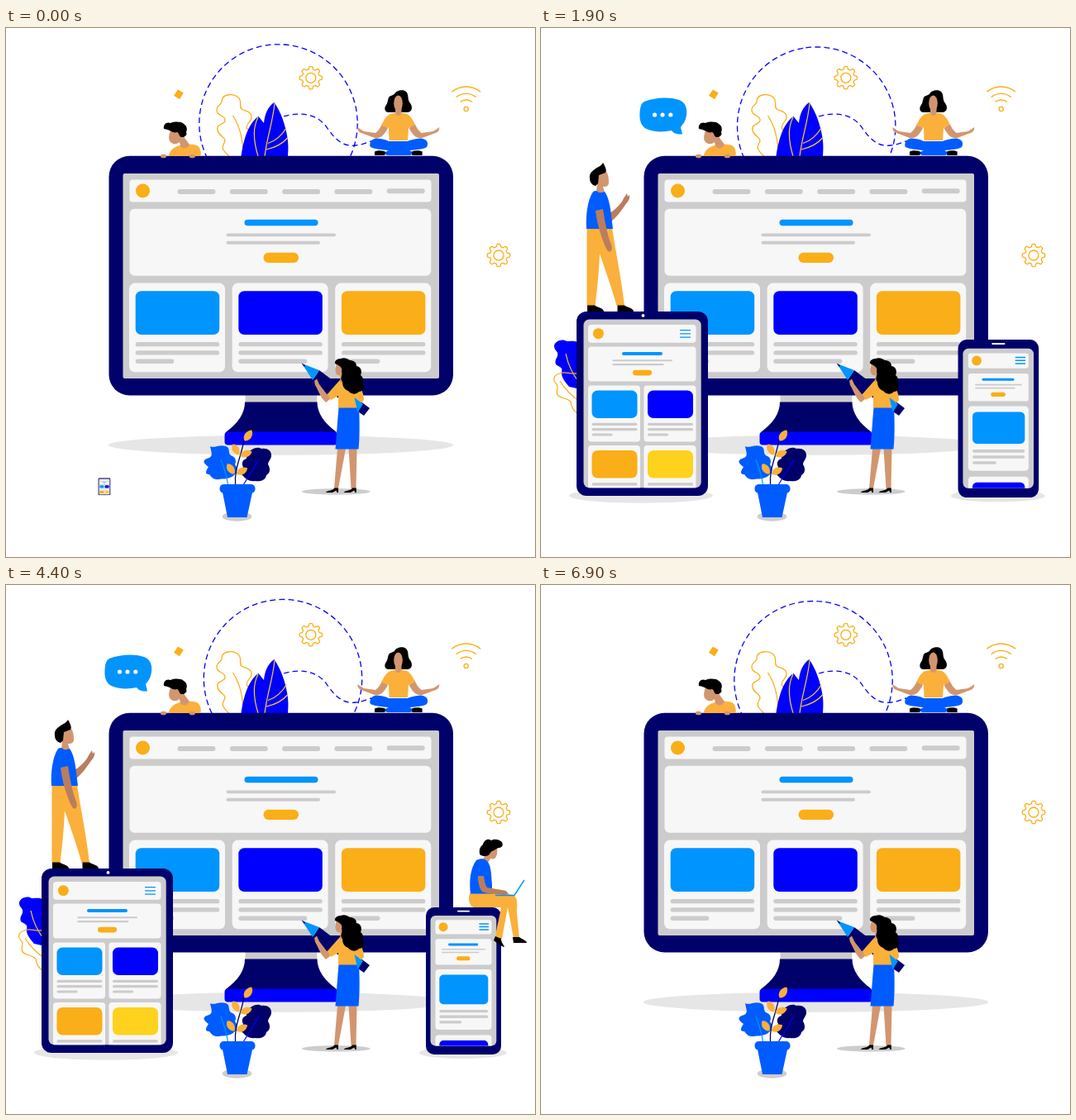
An HTML page with a canvas that plays this animation: 640x640 px, repeating every 7 s.

```html
<!DOCTYPE html>
<html lang="en">
<head>
<meta charset="utf-8">
<title>Responsive design</title>
<style>
html, body { margin: 0; width: 100%; height: 100%; overflow: hidden; background: #fff; }
canvas { display: block; width: 640px; height: 640px; }
</style>
</head>
<body>
<canvas id="stage" width="640" height="640"></canvas>
<script>
const ctx = document.getElementById('stage').getContext('2d');
const LOOP = 7000, STEP = 100, TAU = Math.PI * 2;
const NAVY = '#00006b', BLUE = '#0000ff', MID = '#005cff', SKY = '#0094ff';
const ORANGE = '#faae17', CLOTH = '#fbb03b', YELLOW = '#ffd21e';
const GREY = '#cccccc', PANEL = '#f7f7f7', SHADE = '#e6e6e6';
const SKIN = '#d2966f', TAN = '#b97e5d', BLACK = '#000', WHITE = '#fff';

// Drawing helpers
function box(x1, y1, x2, y2, r, color) {
  ctx.fillStyle = color;
  ctx.beginPath();
  ctx.roundRect(x1, y1, x2 - x1, y2 - y1, r);
  ctx.fill();
}
function pill(x1, y1, x2, y2, color = GREY) { box(x1, y1, x2, y2, (y2 - y1) / 2, color); }
function oval(x, y, rx, ry, color) {
  ctx.fillStyle = color;
  ctx.beginPath();
  ctx.ellipse(x, y, rx, ry, 0, 0, TAU);
  ctx.fill();
}
function dot(x, y, r, color) { oval(x, y, r, r, color); }
function shape(d, color) {
  ctx.fillStyle = color;
  ctx.fill(new Path2D(d));
}
function line(d, color, width = 1.3) {
  ctx.strokeStyle = color;
  ctx.lineWidth = width;
  ctx.stroke(new Path2D(d));
}
function scaled(s, x, y, draw) {
  if (s <= 0) return;
  ctx.save();
  ctx.translate(x, y);
  ctx.scale(s, s);
  ctx.translate(-x, -y);
  draw();
  ctx.restore();
}
function mirrored(axis, draw) {
  draw();
  ctx.save();
  ctx.translate(2 * axis, 0);
  ctx.scale(-1, 1);
  draw();
  ctx.restore();
}

// Motion: each key is [time, value, easing towards it]
const linear = x => x;
const outQuad = x => 1 - (1 - x) ** 2;
const inOut = x => x < .5 ? 2 * x * x : 1 - 2 * (1 - x) ** 2;
function track(t, keys) {
  if (t <= keys[0][0]) return keys[0][1];
  for (let i = 1; i < keys.length; i++) {
    const [t0, v0] = keys[i - 1], [t1, v1, ease = inOut] = keys[i];
    if (t < t1) return v0 + (v1 - v0) * ease((t - t0) / (t1 - t0));
  }
  return keys[keys.length - 1][1];
}
const MOTION = {
  tablet: [[0, .092], [500, 1.172, outQuad], [800, 1], [5350, 1], [5750, 0, linear]],
  phone: [[1200, 0], [1900, 1.073, outQuad], [2200, 1], [6300, 1], [6700, 0, linear]],
  walker: [[850, 0], [1300, 1], [4850, 1], [5250, 0]],
  bubble: [[1300, 0], [1700, 1.54], [1900, 1], [4700, 1], [4900, 1.3], [5200, 0]],
  sitter: [[1900, 0], [2200, 1.17], [2400, 1], [5800, 1], [6200, 0]],
  bulb: [[2500, 0], [2900, 2.2], [3200, 1], [3500, 1], [3800, 2.15], [4200, 0]]
};

function orbit(t) {
  const a = TAU * t / LOOP;
  ctx.save();
  ctx.translate(332.75, 115.5);
  ctx.rotate(-a);
  ctx.strokeStyle = BLUE;
  ctx.lineWidth = 1.3;
  const period = TAU * 95.7 / 54;
  ctx.setLineDash([period * .62, period * .38]);
  ctx.beginPath();
  ctx.arc(-3.25, 0, 95.7, 0, TAU);
  ctx.stroke();
  ctx.restore();
}

function gear(x, y) {
  ctx.strokeStyle = ORANGE;
  ctx.lineWidth = 1.3;
  ctx.beginPath();
  for (let i = 0; i <= 160; i++) {
    const a = TAU * i / 160, r = 12.1 + 1.6 * Math.tanh(2.6 * Math.cos(8 * a));
    ctx.lineTo(x + r * Math.cos(a), y + r * Math.sin(a));
  }
  ctx.closePath();
  ctx.moveTo(x + 6, y);
  ctx.arc(x, y, 6, 0, TAU);
  ctx.stroke();
}

function wifi() {
  ctx.strokeStyle = ORANGE;
  ctx.lineWidth = 1.3;
  ctx.beginPath();
  ctx.arc(556.7, 98, 2.6, 0, TAU);
  ctx.stroke();
  for (const r of [11, 18.7, 27]) {
    ctx.beginPath();
    ctx.arc(556.7, 98, r, -Math.PI / 2 - .7, -Math.PI / 2 + .7);
    ctx.stroke();
  }
}

function backdrop() {
  ctx.setLineDash([6.5, 4.3]);
  line('M336 107C360 100 378 106 388 120C398 135 408 144 423 142C432 141 437 138 442 137', BLUE);
  ctx.setLineDash([]);
  line('M269.5 155C263 148 260 146 264 139C268 132 258 132 256 124C254 115 264 118 265 112C266 105 254 107 255 98C256 92 262 93 261 88C262 80 273 79 280 83C287 88 281 94 285 98C289 101 296 100 297 107C298 113 291 114 291 121L296 126', ORANGE);
  line('M274.500 106C283 119 287 136 287 155', ORANGE);
  shape('M284.500 155C287 138 292 116 305.500 107L312 115C313 104 317 95 324.500 90C333 102 338 118 340 130C342 140 341.500 148 341 155Z', BLUE);
  line('M325 91C323 113 316 131 313 155M305 108C298 121 300 139 305 155M339 121C333 131 325 137 317 139.500M340.500 133C333 142 324 145 315 147', YELLOW, 1.2);
  shape('M208 74.500L214.700 78.500 210 86.200 203 81.800Z', ORANGE);
  gear(368.8, 60.3);
  gear(596, 275);
  wifi();
}

function monitor() {
  oval(332.5, 504.7, 208.5, 12, SHADE);
  box(289.5, 440, 376.3, 453, 0, GREY);
  shape('M289 452.500H376.500C376.500 466 385 478 400 489H266C281 478 289 466 289 452.500Z', NAVY);
  box(264.5, 488.5, 401, 504.5, 4, BLUE);
  box(124.5, 154.8, 541, 444.5, 25, NAVY);
  box(141.5, 176, 524, 424, 2, GREY);
  box(149.5, 183.5, 514.5, 210.5, 4, PANEL);
  dot(165.5, 197, 8.5, ORANGE);
  for (let i = 0; i < 5; i++) {
    const x = 207.5 + i * 63.3, y = i < 4 ? 195 : 194.3;
    pill(x, y, x + 46, y + 6);
  }
  box(149.5, 218.7, 514.3, 299.8, 6, PANEL);
  pill(288.5, 231.8, 377.5, 239.3, SKY);
  pill(266.5, 248.4, 399, 252.3);
  pill(266.5, 257.8, 380, 261.7);
  box(311.5, 271.8, 354, 284, 6, ORANGE);
  [[SKY, 46.5], [BLUE, 83], [ORANGE, 46.5]].forEach(([color, last], i) => {
    const x = 149 + i * 124.6;
    box(x, 308.6, x + 116, 416.3, 7, PANEL);
    box(x + 7.7, 318.2, x + 109.2, 371, 7, color);
    for (let k = 0; k < 3; k++) {
      const y = 380 + k * 10.3;
      pill(x + 7.7, y, x + 7.7 + (k < 2 ? 101.5 : last), y + 5.3);
    }
  });
}

function boy() {
  shape('M196.500 155C198 148 204 143 211 142C220 140 232 140 234 145C236 149 236 152 235.500 155Z', CLOTH);
  shape('M209 133L214 130 222 141C219 147 213 146 211 143Z', SKIN);
  shape('M199 124C197 130 196 135 199 138C203 142 208 140 210 138L214 130 207 124Z', SKIN);
  shape('M191 122C190 117 194 113 199 115C204 113 212 113 215 116C220 119 219 124 218 126C220 130 215 132 214 132C209 133 210 127 207 126C202 128 199 123 191 122Z', BLACK);
  oval(190.5, 155, 3.6, 2.3, SKIN);
  oval(225.3, 155, 3.6, 2.3, SKIN);
}

function yogi() {
  shape('M470 80C472 75 481 74 484 77C488 81 485 86 489 91C492 95 492 101 486 102H463C458 102 457 97 460 93C463 89 461 83 466 82Z', BLACK);
  mirrored(474.8, () => {
    shape('M455 116L462 121C457 131 452 134 446 133L430 127C426 126 425 122 425.500 120L428 122 433 125 447 127C451 124 453 120 455 116Z', SKIN);
    shape('M446 149.500C452 147 457 149 460 150L458 154H446Z', BLACK);
  });
  shape('M448 133.500C441 134 439 141 441 144C447 147 455 147 463 148C457 150 458 154 462 154H489C492 153 493 150 488 148C497 147 505 147 509 144C512 139 509 134 502 133.500C495 134 488 136 486 137H463C460 135 455 134 448 133.500Z', MID);
  shape('M470 103H479.500C487 103 490 107 495 117L487 121 486 136H463.500L463 121 454 118C459 108 461 104 470 103Z', CLOTH);
  shape('M471 96H478.500V103C477 107 473 107 471 103Z', SKIN);
  oval(474.5, 91, 5.3, 9.5, SKIN);
}

function painter() {
  oval(399.3, 560.8, 41.5, 3.7, GREY);
  shape('M379 414L440 460 433 469 371 426Z', NAVY);
  shape('M358 406L379 414 371 426Z', SKY);
  shape('M357.500 405.500L362 408 361 410Z', NAVY);
  shape('M401 509H411L402 557H397Z M414.500 509H424.500L423.500 557H417.500Z', SKIN);
  for (const dx of [0, 21.8]) {
    ctx.save();
    ctx.translate(dx, 0);
    shape('M387 561.700C390 559 395 560 397.500 556.500H402V562H400.500L399.500 559.500 395 562H387Z', BLACK);
    ctx.restore();
  }
  shape('M402.500 459H427C428 477 428 495 426.500 509.500H398.500C400 492 401 475 402.500 459Z', MID);
  shape('M373 427L376 424.500 379 431C382 435 386 440 388 443L394 441 392 449 387 453C380 447 378 438 374 432Z', SKIN);
  shape('M405 425C400 430 394 437 389 443L393 450 402 445V459.500H425L433 450C433 440 428 432 420 428Z', CLOTH);
  shape('M421.500 447L432 455 425.500 465Z', SKY);
  shape('M400 406C398 411 398 416 400 419C402 421 404 420 404.500 420L404 428 413 431V408Z', SKIN);
  shape('M398 406C397 401 403 400 405 400C410 398 414 401 416 402C420 402 424 404 424 409C430 410 431 416 429 420C434 424 431 428 432 431C435 437 430 440 427 440C422 445 416 442 414 439C409 437 407 433 407 428C403 424 408 420 406 416C408 410 402 408 398 406Z', BLACK);
}

function pottedPlant() {
  oval(279.5, 591, 17.8, 5.8, GREY);
  shape('M247 506C252 509 258 503 266 506C272 508 268 514 272 517C278 519 279 524 277 528C282 534 279 541 271 544C266 546 262 545 258 546C251 547 248 543 246 540C239 540 243 534 245 531C238 526 238 523 243 521C252 519 248 513 247 506Z', MID);
  line('M260 522C263 531 267 540 268.500 553', SKY, 1.2);
  shape('M296 511C301 507 306 507 309 509C316 508 321 511 321 517C321 522 317 524 317 528C320 533 320 538 315 541C314 548 306 549 301 548C296 549 290 546 287 542C283 540 285 533 287 531C284 526 287 522 291 521C291 517 292 513 296 511Z', NAVY);
  line('M306 522L287 553', BLUE, 1.2);
  line('M277.500 553C276 532 285 518 288 498', NAVY, 1.3);
  const leaf = (x, y, angle, size = 1) => {
    ctx.save();
    ctx.translate(x, y);
    ctx.rotate(angle);
    ctx.scale(size, size);
    shape('M-7.500 0C-4 -6 4 -5 7.500 0C4 5 -4 6 -7.500 0Z', CLOTH);
    ctx.restore();
  };
  leaf(293, 493, -.98, 1.05);
  leaf(278, 510, 1.05);
  leaf(290.5, 515, -.35);
  leaf(272, 533.5, .95);
  leaf(285.5, 536, -.5);
  box(258.5, 552, 301.5, 562.7, 5, MID);
  shape('M262 562H298L291.500 592H268Z', MID);
}

function menu(x1, x2, top, gap) {
  for (let i = 0; i < 3; i++) line(`M${x1} ${top + i * gap}H${x2}`, SKY, 1.3);
}

function screen(x1, y1, x2, y2, r, draw) {
  box(x1, y1, x2, y2, r, GREY);
  ctx.save();
  ctx.beginPath();
  ctx.roundRect(x1, y1, x2 - x1, y2 - y1, r);
  ctx.clip();
  draw();
  ctx.restore();
}

function tablet() {
  oval(121, 565.8, 87, 9, SHADE);
  box(43, 343, 202, 566, 12, NAVY);
  dot(123.5, 347.9, 1.9, WHITE);
  screen(51.5, 352.5, 193.7, 556.2, 7, () => {
    box(57, 359, 187.5, 380.7, 4, PANEL);
    dot(69.4, 369.7, 6.5, ORANGE);
    menu(168, 181, 365.7, 4.2);
    box(57, 385.5, 187.5, 427.5, 4, PANEL);
    pill(98, 392, 147, 396, SKY);
    pill(86.3, 401.2, 159, 403.2);
    pill(86.3, 406.1, 148.5, 408.2);
    pill(111, 413.8, 134, 420.4, ORANGE);
    [SKY, BLUE, ORANGE, YELLOW].forEach((color, i) => {
      const x = 57 + i % 2 * 67.5, y = 432.5 + (i >> 1) * 72.5;
      box(x, y, x + 63, y + 68, 4, PANEL);
      box(x + 4.5, y + 6, x + 59.5, y + 39.5, 7, color);
      for (let k = 0; k < 3; k++) {
        const ly = y + 45.3 + k * 6.3;
        pill(x + 4.5, ly, x + (k < 2 ? 59.5 : 29.7), ly + 3.2);
      }
    });
  });
}

function phone() {
  oval(553, 566, 53, 7, SHADE);
  box(508, 390, 599, 568, 10, NAVY);
  pill(546, 393.8, 561, 395.6, WHITE);
  screen(513.5, 400, 593.3, 557.5, 6, () => {
    box(519.5, 405.3, 587.5, 422.4, 3, PANEL);
    dot(529, 413.7, 5.5, ORANGE);
    menu(572.5, 584, 410, 3.5);
    box(519.5, 428.2, 587.5, 459.5, 3, PANEL);
    pill(535, 433.5, 571.3, 436.4, SKY);
    pill(527, 440.1, 580, 441.6);
    pill(527, 443.8, 572.5, 445.3);
    pill(545, 449.3, 561.5, 454.3, ORANGE);
    [SKY, BLUE].forEach((color, i) => {
      const y = 465 + i * 79.5;
      box(519.5, y, 587.5, y + 73, 4, PANEL);
      box(524.3, y + 6.5, 583.3, y + 42.3, 5, color);
      for (let k = 0; k < 3; k++) {
        const ly = y + 49 + k * 6.6;
        pill(524.3, ly, k < 2 ? 583.3 : 551.3, ly + 3.3);
      }
    });
  });
}

function sidePlant() {
  shape('M48 382C38 376 33 381 29 378C22 376 15 381 16 386C17 391 21 391 20 396C20 399 16 401 18 407C21 410 27 410 25 416C24 422 29 428 34 434L48 437Z', BLUE);
  line('M30 394C33 409 39 420 47 430', YELLOW, 1.2);
  line('M46 417C36 421 30 414 22 418C15 420 14 426 18 430C23 433 17 439 20 444C25 449 31 447 36 452C36 458 39 463 46 468M23 427C28 436 38 446 46 451', ORANGE, 1.2);
}

function walker() {
  shape('M78 225L86 222C92 217 97 213 100 206L104 200 105 204 107 202C108 208 104 211 102 214C96 223 90 230 85 234Z', TAN);
  shape('M55.500 242H86C90 268 97 302 101 336H91.500C86 316 78 293 71 273C70 296 68 316 65.500 336H55.500Z', CLOTH);
  shape('M56 335.500H65C70 339 76 339 76 343H56ZM92.500 335.500H101C106 339 112 339 112 343H92.500Z', BLACK);
  shape('M69 177L79 174C82 178 82 184 82 188C81 192 78 192 75 192L77 199C74 202 70 201 67 198L68 188Z', SKIN);
  shape('M63 198C66 196 68 197 70 199C73 200 75 198 77 198C82 205 84 217 85 227L87 243H55C54 228 56 208 63 198Z', MID);
  shape('M66 221L75 219C77 232 80 250 85 262C87 268 85 272 81 270C76 262 68 240 66 221Z', TAN);
  shape('M59 182C58 176 62 173 65 171C68 168 72 168 75 163C78 168 80 173 78 175L70 178 69 188 66 191C62 190 59 187 59 182Z', BLACK);
}

function sitter() {
  shape('M561 373H590C600 373 610 373 615 376C620 381 618 388 618 396L621 427H614L607 390 600 428 592 426C594 412 597 402 599 390H566C560 388 559 380 561 373Z', CLOTH);
  shape('M592 425L599 428C599 432 602 435 603 438C598 437 593 432 590 430ZM613 426H621C625 429 630 430 630 433H614Z', BLACK);
  shape('M584 322L594 318C595 323 594 329 591 331C588 332 587 331 586 331L583 336 576 334 580 326Z', SKIN);
  shape('M569 333C575 330 580 331 583 335C587 341 587 350 588 362V373.500H562C560 358 562 342 569 333Z', MID);
  shape('M571 352H578C579 358 580 364 582 366C590 367 598 369 605 370L608 374 604 375C595 374 583 374 576 371C572 366 571 358 571 352Z', TAN);
  line('M592 375.500H615L627 357', SKY, 1.4);
  shape('M573 325C572 318 575 316 577 314C578 309 583 306 587 309C592 306 598 309 600 311C602 315 600 318 596 318C592 319 592 321 588 322C585 324 585 328 580 328C577 328 574 328 573 325Z', BLACK);
}

function bubble() {
  shape('M125 89C138 84 155 83 167 87C176 90 178 100 175 110C173 116 170 118 169 120L171 128.500C164 129 160 127 158 124C148 126 138 126 130 123C121 120 119 112 119.500 103C120 96 121 91 125 89Z', SKY);
  for (const x of [137.5, 147, 156.8]) dot(x, 105, 2.6, WHITE);
}

function bulb() {
  line('M61 115.500C61 107 50 100 50 87C50 75 59 67 70.500 67C82 67 91 75 91 87C91 100 80 107 80 115.500Z', ORANGE, 2);
  line('M67.500 115C68 103 60 99 60.500 92C61 86 67 85 68 91C68 99 73 99 73 91C74 85 80 86 80.500 92C80 99 73 103 73.500 115M68 95V115M73 95V115', ORANGE, 1.7);
  pill(60, 119.3, 81, 122.7, BLUE);
  pill(60, 125, 81, 128.5, BLUE);
  shape('M62 131H79C77 133 76 134 75 136C72 137 69 137 66 136C65 134 64 133 62 131Z', BLUE);
}

function rays() {
  line('M70.500 36V54M37 47L48.500 61.500M104 47.500L92 62M19 78.500L37.500 81.500M121.500 79L103 82', ORANGE, 2);
}

function render(t) {
  const size = name => track(t, MOTION[name]);
  ctx.fillStyle = WHITE;
  ctx.fillRect(0, 0, 640, 640);
  orbit(t);
  backdrop();
  monitor();
  boy();
  yogi();
  pottedPlant();
  painter();
  scaled(size('walker'), 46, 430, sidePlant);
  scaled(size('tablet'), 118.6, 565, tablet);
  scaled(size('walker'), 84, 343, walker);
  scaled(size('phone'), 555.3, 567.5, phone);
  scaled(size('sitter'), 580, 390, sitter);
  scaled(size('bubble'), 171, 128, bubble);
  scaled(size('bulb'), 70.5, 92, bulb);
  if (t >= 3300 && t < 3600) rays();
}

const start = performance.now();
function tick() {
  const elapsed = Math.max(0, performance.now() - start) % LOOP;
  render(Math.floor(elapsed / STEP) * STEP);
  requestAnimationFrame(tick);
}
tick();
</script>
</body>
</html>
```
